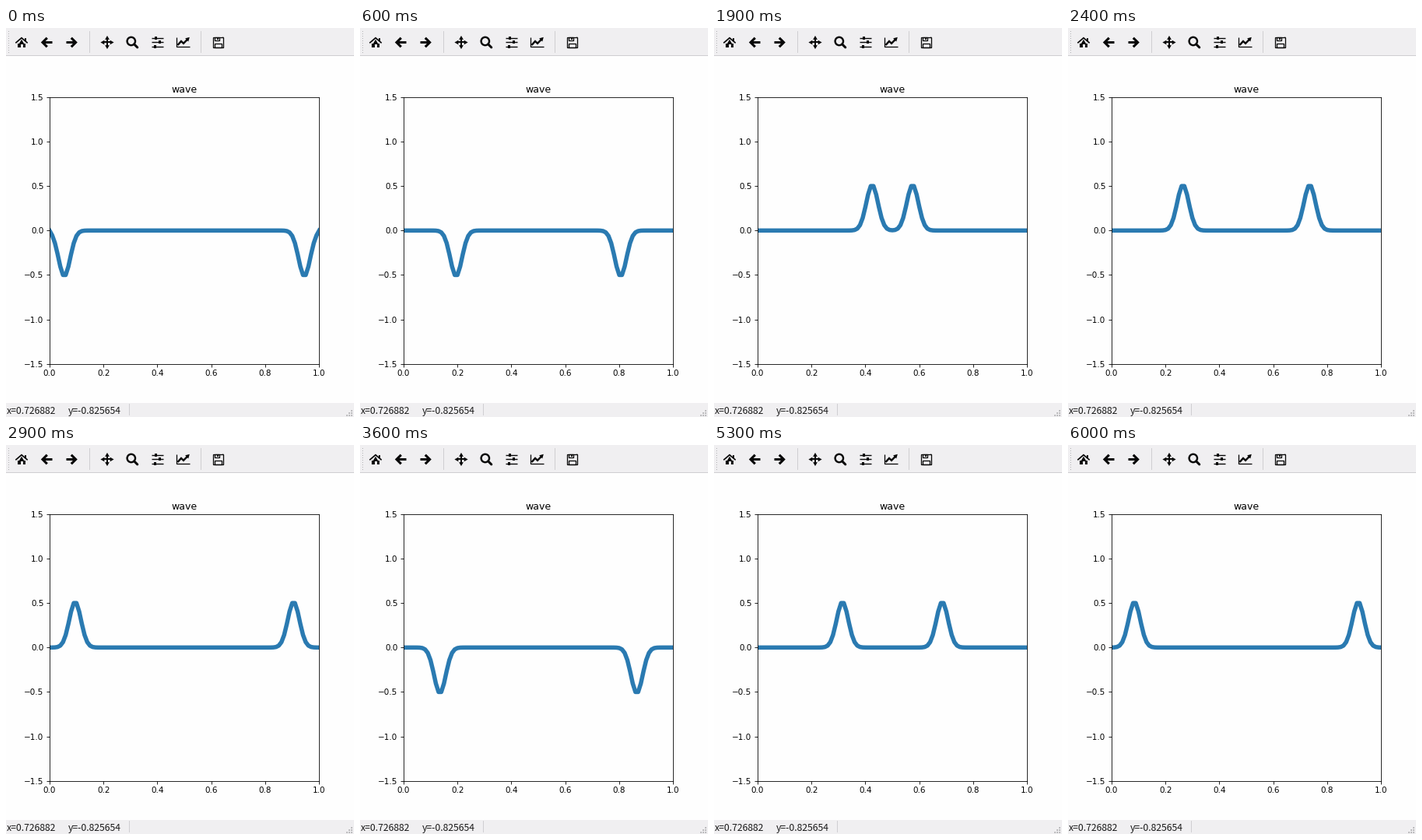
These frames come from a looping animation (447 by 500 pixels, 6100 ms). A matplotlib script:

```python
import numpy as np
import matplotlib.pyplot as plt
from matplotlib.animation import FuncAnimation
from matplotlib.patches import Circle, Rectangle, RegularPolygon

W, H, DPI = 447, 500, 75
FRAMES, INTERVAL = 61, 100
CYCLE = 100                     # solver steps before the run restarts
INK, PANEL, RULE = "#080808", "#f0eff1", "#cfced1"
PAPER, BLUE = "#fefefe", "#2a7ab1"
MID = 18.5                      # centre line of the toolbar

plt.rcParams["font.family"] = "DejaVu Sans"
fig = plt.figure(figsize=((W + 0.01) / DPI, (H + 0.01) / DPI), dpi=DPI,
                 facecolor=PAPER)

# Window chrome, in pixel coordinates with y pointing down
ui = fig.add_axes([0, 0, 1, 1])
ui.set_xlim(0, W)
ui.set_ylim(H, 0)
ui.axis("off")


def px(size):
    """Pixels to points."""
    return size * 72 / DPI


def stroke(xs, ys, lw, cap="butt"):
    ui.plot(xs, ys, color=INK, lw=px(lw), solid_capstyle=cap,
            solid_joinstyle="miter")


def box(x, y, w, h, color=INK):
    ui.add_patch(Rectangle((x, y), w, h, fc=color, ec="none"))


def frame(x, y, w, h, lw=1.3):
    ui.add_patch(Rectangle((x, y), w, h, fill=False, ec=INK, lw=px(lw)))


def triangle(x, y, r, angle):
    """Filled triangle pointing along the angle, in degrees clockwise."""
    ui.add_patch(RegularPolygon((x, y), 3, radius=r, fc=INK, ec="none",
                                orientation=np.radians(angle - 90)))


def home(cx):
    stroke([cx - 7.7, cx, cx + 7.7], [MID + 0.8, MID - 5.8, MID + 0.8], 1.7)
    triangle(cx, MID + 0.6, 4.4, -90)
    box(cx - 5.3, MID + 1.2, 10.6, 5.3)
    box(cx - 1.5, MID + 2.5, 3, 4, PANEL)
    box(cx + 3.6, MID - 5.9, 2, 4)


def arrow(cx, way):
    """Thick arrow; way is -1 for left, 1 for right."""
    stroke([cx - way * 0.4, cx + way * 5.4, cx - way * 0.4],
           [MID - 5.8, MID, MID + 5.8], 3.1)
    stroke([cx - way * 7, cx + way * 5], [MID, MID], 3)


def move(cx):
    for angle in range(0, 360, 90):
        dx, dy = np.cos(np.radians(angle)), np.sin(np.radians(angle))
        stroke([cx, cx + 6 * dx], [MID, MID + 6 * dy], 2)
        triangle(cx + 5.3 * dx, MID + 5.3 * dy, 3.3, angle)


def magnifier(cx):
    ui.add_patch(Circle((cx - 1.2, MID - 1.5), 5.2, fill=False, ec=INK,
                        lw=px(2.4)))
    stroke([cx + 2.6, cx + 6.8], [MID + 2.3, MID + 6.5], 3, cap="round")


def sliders(cx):
    for row, shift in enumerate((-2, 3.5, -3)):
        y = MID + 5.2 * (row - 1)
        stroke([cx - 7.5, cx + 7.5], [y, y], 1.4)
        box(cx + shift - 2.4, y - 2.4, 4.8, 4.8, PANEL)
        box(cx + shift - 1.6, y - 2, 3.2, 4)


def chart(cx):
    stroke([cx - 8.5, cx - 8.5, cx + 8.7], [MID - 6.5, MID + 6, MID + 6], 1.3)
    stroke([cx - 6.5, cx - 2, cx + 1, cx + 6.5],
           [MID + 3.5, MID - 1.5, MID + 1.3, MID - 4.3], 2.4)
    triangle(cx + 6.4, MID - 4.3, 3.4, -45)


def floppy(cx):
    frame(cx - 6.5, MID - 6.5, 13, 13)
    frame(cx - 4.2, MID + 1.7, 8.4, 4.8)
    frame(cx - 4.2, MID - 6.5, 6.3, 4.4)
    box(cx - 0.9, MID - 6, 1.7, 3)
    triangle(cx + 6.3, MID - 6.3, 1, -45)


def toolbar():
    box(0, 0, W, 35, PANEL)
    box(0, 35, W, 1, RULE)
    for y in range(4, 33, 3):
        box(3, y, 1, 1, "#b4b4b6")
    for x in (107, 250):
        box(x, 4, 1, 28, RULE)
    home(20)
    arrow(52.4, -1)
    arrow(84.2, 1)
    move(130)
    magnifier(162)
    sliders(194.3)
    chart(227)
    floppy(272.3)


def status_bar():
    box(0, 482, W, 18, PANEL)
    box(158, 483, 1, 15, RULE)
    for x, label in ((1, "x=0.726882"), (80, "y=-0.825654")):
        ui.text(x, 496, label, family="Noto Sans CJK JP", size=px(12.2),
                color="#1a1a1a", va="baseline")
    for row in range(3):
        for col in range(row + 1):
            box(443 - 3 * col, 491 + 3 * row, 2, 2, "#bcbcbe")


toolbar()
status_bar()

# Plot area
TOP, BOTTOM = 88.9, 431.7
ax = fig.add_axes([0.125, 1 - BOTTOM / H, 0.775, (BOTTOM - TOP) / H])
ax.set_facecolor(PAPER)
ax.set_xlim(0, 1)
ax.set_ylim(-1.5, 1.5)
ax.set_title("wave")


def solve(x, steps):
    """Plucked string with fixed ends, leapfrog scheme at unit Courant number."""
    u = np.exp(-1000 * (x - 0.5) ** 2)
    u[0] = u[-1] = 0
    states = [u, u.copy()]
    while len(states) < steps:
        old, now = states[-2:]
        new = np.zeros_like(now)
        new[1:-1] = now[2:] + now[:-2] - old[1:-1]
        states.append(new)
    return states


x = np.linspace(0, 1, 101)
states = solve(x, CYCLE)
curve, = ax.plot(x, states[0], color=BLUE, lw=px(5.5))


def step_at(i):
    """Solver step on screen: a slower first second, then a steady pace."""
    slow = min(i, 11)
    return round(56 + 2.36 * slow + 3.27 * (i - slow)) % CYCLE


def draw(i):
    curve.set_ydata(states[step_at(i)])
    return curve,


anim = FuncAnimation(fig, draw, frames=FRAMES, interval=INTERVAL, repeat=True)
plt.show()
```
